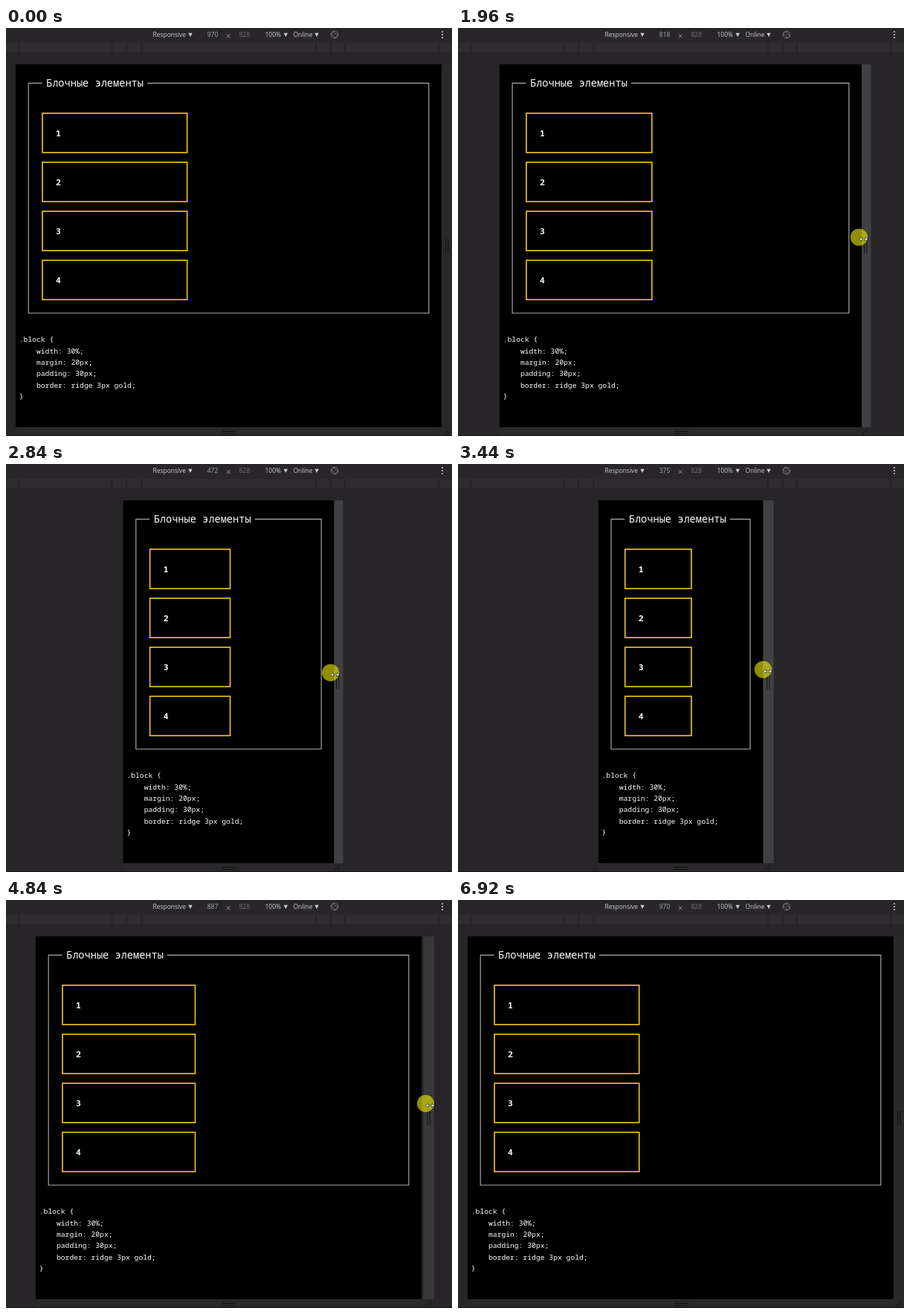
These frames come from a looping animation (600 by 550 pixels, 7080 ms). An HTML page:

```html
<!DOCTYPE html>
<html lang="ru">
<head>
<meta charset="utf-8">
<title>Блочные элементы</title>
<style>
html, body { margin: 0; width: 100%; height: 100%; overflow: hidden; background: #272527; }
svg { display: block; width: 600px; height: 550px; }
.ui { font: 8.45px "Open Sans", "Noto Sans", sans-serif; fill: #cbcacb; }
.mono { font-family: "Noto Sans Mono", "DejaVu Sans Mono", monospace; fill: #fff; }
.legend { font-size: 13.65px; font-weight: 500; }
.digit { font-size: 11.4px; font-weight: 600; }
.code { font-size: 9.7px; font-weight: 500; }
</style>
</head>
<body>
<svg id="stage" viewBox="0 0 600 550" xmlns="http://www.w3.org/2000/svg">
  <rect width="600" height="550" fill="#272527"/>
  <rect width="600" height="19" fill="#282629"/>
  <rect y="20" width="600" height="13" fill="#2e2c2e"/>
  <g id="ticks" fill="#252325"></g>

  <g class="ui">
    <text x="197.5" y="12.3">Responsive</text>
    <text id="size" x="278" y="12.3" text-anchor="middle" fill="#a9a9ab"></text>
    <text x="313.5" y="12.3" fill="#737275">828</text>
    <text x="348.5" y="12.3">100%</text>
    <text x="386.5" y="12.3">Online</text>
    <path d="M245.3 6.7h5.4l-2.7 5.2zM373.6 6.7h5.4l-2.7 5.2zM415.3 6.7h5.4l-2.7 5.2z"/>
    <circle cx="587" cy="5" r="1.1"/><circle cx="587" cy="9" r="1.1"/><circle cx="587" cy="13" r="1.1"/>
  </g>
  <path d="M296.7 8.2l5 5m0-5l-5 5" stroke="#a5a5a7" stroke-width=".9"/>
  <g fill="none" stroke="#8c8b8d" stroke-width=".8">
    <circle cx="442" cy="9" r="4.7"/>
    <rect x="440" y="4.8" width="4" height="8.4" rx=".6" transform="rotate(-45 442 9)"/>
  </g>

  <rect id="foot" y="538" height="11" fill="#2a282a"/>
  <path d="M290 543.7h19M290 546.6h19" stroke="#111" stroke-width="1"/>
  <rect y="549" width="600" height="1" fill="#171618"/>

  <g id="bar">
    <rect id="grip" y="49" width="14.5" height="489"/>
    <path d="M5.6 284v19.5M8.8 284v19.5" stroke="#121213" stroke-width="1"/>
    <path d="M2.5 547.5l8-7M7 548l4-3.6" stroke="#111" stroke-width="1"/>
  </g>

  <g id="page">
    <rect id="sheet" y="49" height="489"/>
    <path id="frame" fill="none" stroke="#aaa" stroke-width="1.15"/>
    <text class="mono legend" x="41" y="79.2">Блочные элементы</text>
    <g id="blocks"></g>
    <g id="code"></g>
  </g>

  <g id="cursor">
    <circle r="11.6" fill="#ff0" opacity=".56"/>
    <g transform="translate(6.2 2.7)">
      <path d="M-5.6 0l3-2.6v1.9h5.2v-1.9l3 2.6l-3 2.6v-1.9h-5.2v1.9z" fill="#fff" stroke="#111" stroke-width=".6"/>
    </g>
  </g>
</svg>
<script>
const LOOP = 7080, STEP = 40, MID = 299.5, SCALE = 573 / 970;
const LAG = 24, LEAD = 26;
const $ = id => document.getElementById(id);

function add(parent, tag, attrs, text) {
  const el = document.createElementNS("http://www.w3.org/2000/svg", tag);
  for (const k in attrs) el.setAttribute(k, attrs[k]);
  if (text) el.textContent = text;
  return parent.appendChild(el);
}

[17, 142.5, 162, 182.5, 417, 436.5, 456, 582].forEach(x =>
  add($("ticks"), "rect", { x: x - 1, y: 20, width: 2, height: 13 }));

const boxes = [1, 2, 3, 4].map((n, i) => {
  const y = 114.9 + 66.1 * i;
  add($("blocks"), "text", { class: "mono digit", x: 54, y: y + 30.6 }, String(n));
  return add($("blocks"), "rect", {
    x: 36, y, width: 0, height: 53, fill: "none", stroke: "#e2b91a", "stroke-width": 1.75
  });
});

[".block {", "width: 30%;", "margin: 20px;", "padding: 30px;", "border: ridge 3px gold;", "}"]
  .forEach((line, i) => add($("code"), "text", {
    class: "mono code", x: i % 5 ? 28 : 4.8, y: 423.2 + 15.4 * i
  }, line));

// Monotone cubic curve through [time, value] points, flat at both ends
function curve(pts) {
  const d = pts.slice(1).map((p, i) => (p[1] - pts[i][1]) / (p[0] - pts[i][0]));
  const m = pts.map((p, i) => {
    const a = d[i - 1] || 0, b = d[i] || 0;
    return a * b > 0 ? 2 * a * b / (a + b) : 0;
  });
  return t => {
    const last = pts.length - 1;
    if (t <= pts[0][0]) return pts[0][1];
    if (t >= pts[last][0]) return pts[last][1];
    const i = pts.findIndex(p => p[0] > t) - 1;
    const h = pts[i + 1][0] - pts[i][0], s = (t - pts[i][0]) / h, r = 1 - s;
    return pts[i][1] * r * r * (1 + 2 * s) + pts[i + 1][1] * s * s * (3 - 2 * s)
      + h * s * r * (m[i] * r - m[i + 1] * s);
  };
}

const width = curve([[1480, 970], [1960, 818], [2200, 765], [2440, 638], [2920, 447],
  [3240, 375], [3680, 375], [4280, 688], [4400, 738], [4760, 860], [5120, 967], [5160, 970]]);
const pointerY = curve([[600, 294], [1320, 282], [1960, 282], [2440, 283], [3440, 277],
  [4280, 274], [5800, 276], [6200, 284]]);
const away = curve([[600, 28], [1000, 5], [1320, 0], [5840, 0], [6200, 28]]);
const glow = curve([[640, 41], [800, 65], [3680, 65], [3800, 56], [5960, 56], [6120, 41]]);
const edge = w => MID + w * SCALE / 2;

function draw(time) {
  const t = Math.floor(time % LOOP / STEP) * STEP;
  const w = width(t), right = edge(w);
  const pw = width(t - LAG) * SCALE, left = MID - pw / 2;
  const g = Math.round(glow(t));

  $("size").textContent = Math.round(w);
  $("bar").setAttribute("transform", `translate(${right} 0)`);
  $("grip").setAttribute("fill", `rgb(${g},${g - 1},${g + 1})`);
  $("foot").setAttribute("x", left);
  $("foot").setAttribute("width", right + 14.5 - left);

  $("page").setAttribute("transform", `translate(${left} 0)`);
  $("sheet").setAttribute("width", pw);
  $("frame").setAttribute("d", `M35.5 74.3H17.2V384.2H${pw - 17.2}V74.3H177`);
  boxes.forEach(b => b.setAttribute("width", 0.3 * pw + 22.8));

  const shown = t >= 640 && t < 6200;
  $("cursor").setAttribute("visibility", shown ? "visible" : "hidden");
  $("cursor").setAttribute("transform",
    `translate(${edge(width(t + LEAD)) + 0.2 + away(t)} ${pointerY(t)})`);
}

const start = performance.now();
function tick() {
  draw(performance.now() - start);
  requestAnimationFrame(tick);
}
tick();
</script>
</body>
</html>
```
